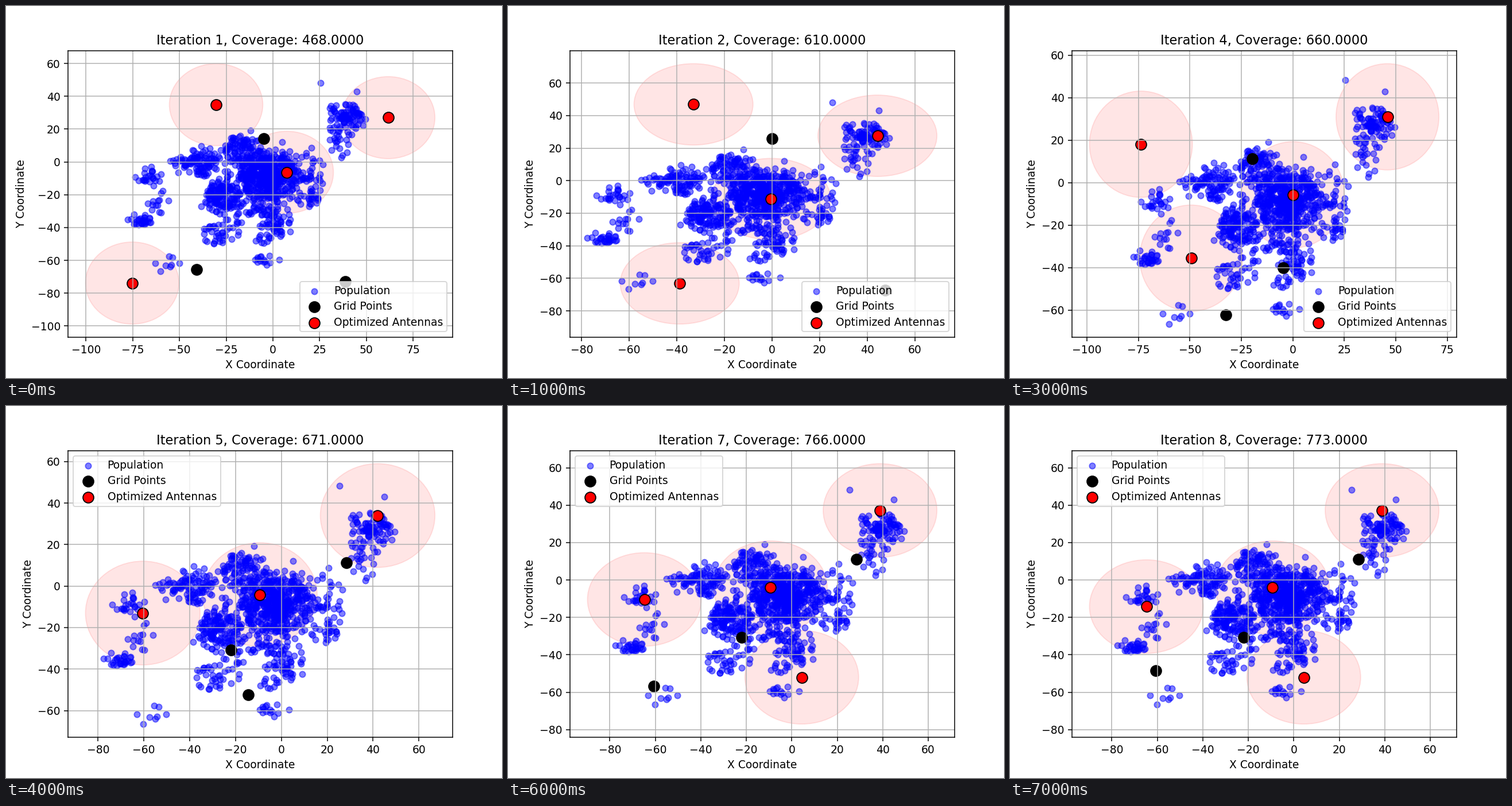
Write a matplotlib script that moves like this. It is 864 px wide and 648 px high and loops after 8 s.

```python
import numpy as np
import matplotlib.pyplot as plt
from matplotlib.animation import FuncAnimation

RADIUS = 25

# Clusters: count, centre x, centre y, spread x, spread y
CLUSTERS = [
    (330, -3, -8, 8, 8), (270, -9, -12, 14, 14), (105, -28, -22, 6, 5),
    (65, -17, 10, 6, 5.5), (70, -38, 0, 5, 5), (22, -47, -1, 5, 3),
    (50, 1, -37, 5, 6), (36, -27, -42, 6, 5), (55, 20, -13, 4, 11),
    (80, 40, 28, 6, 5), (28, 36, 14, 3.5, 6), (24, -66, -9, 4, 3),
    (14, -63, -22, 4, 5), (28, -70, -36, 3.6, 2.8), (7, -56, -62, 4, 2.2),
    (14, -4, -60, 4, 3), (8, -5, -48, 3, 3),
]
# Outermost people, which set the axis limits
EXTREMES = [(-77.56, -35), (-60.2, -66.5), (25.4, 48.2), (44.8, 43)]

# Spots shared by the later layouts
MID, EAST, SOUTH = (-9.4, -4.1), (38.8, 37.2), (4.4, -52)
IDLE = [(28.5, 11.2), (-22, -30.7)]

# Coverage, antennas, unused grid points
STEPS = [
    (468, [(-30.4, 34.9), (61.7, 27), (7.4, -6.3), (-75.3, -73.8)],
     [(-4.8, 14.2), (-40.9, -65.7), (38.7, -72.9)]),
    (610, [(-33, 46.9), (44.3, 27.6), (-0.4, -11.3), (-38.8, -63.1)],
     [(0, 25.7), (47.5, -67.1)]),
    (638, [(-64.9, -15.6), (-3.5, -5.8), (56.05, 17.2)],
     [(-21.2, 12.3), (38.5, 36.5), (-12.1, -34.7), (-47, -45)]),
    (660, [(-73.8, 18.1), (46, 31), (0.1, -5.7), (-49.4, -35.5)],
     [(-19.6, 11.3), (-4.7, -40.1), (-32.4, -62.1)]),
    (671, [(-60.5, -13), MID, (42, 34)], IDLE + [(-14.5, -52.4)]),
    (679, [(-64.8, -10.4), MID, EAST], IDLE + [(-14.5, -52.4)]),
    (766, [(-64.8, -10.4), MID, EAST, SOUTH], IDLE + [(-60.6, -56.8)]),
    (773, [(-64.8, -14.2), MID, EAST, SOUTH], IDLE + [(-60.6, -48.5)]),
]
LOWER_LEGEND = {0, 1, 3}


def blob(rng, count, cx, cy, sx, sy):
    """Normal scatter cut off at about two spreads from the centre."""
    r = np.sqrt(-2 * np.log(1 - 0.87 * rng.random(count)))
    a = rng.uniform(0, 2 * np.pi, count)
    return np.column_stack([cx + sx * r * np.cos(a), cy + sy * r * np.sin(a)])


rng = np.random.default_rng(12)
population = np.vstack([blob(rng, *c) for c in CLUSTERS] + [EXTREMES])
fig, ax = plt.subplots(figsize=(6.4, 4.8), dpi=135)


def draw(i):
    coverage, antennas, spare = STEPS[i]
    ax.clear()
    for spot in antennas:
        ax.add_patch(plt.Circle(spot, RADIUS, color="red", alpha=0.1,
                                zorder=0.5))
    ax.scatter(*population.T, s=30, c="blue", alpha=0.5, label="Population")
    ax.scatter(*zip(*spare), s=100, c="black", label="Grid Points")
    ax.scatter(*zip(*antennas), s=100, c="red", edgecolors="black",
               label="Optimized Antennas")
    ax.autoscale_view()
    ax.set_title(f"Iteration {i + 1}, Coverage: {coverage:.4f}")
    ax.set_xlabel("X Coordinate")
    ax.set_ylabel("Y Coordinate")
    ax.legend(loc="lower right" if i in LOWER_LEGEND else "upper left",
              borderpad=0.36, labelspacing=0.45)
    ax.grid(True)
    return []


anim = FuncAnimation(fig, draw, frames=len(STEPS), init_func=lambda: [],
                     interval=1000, repeat=True, repeat_delay=0)
plt.show()
```
